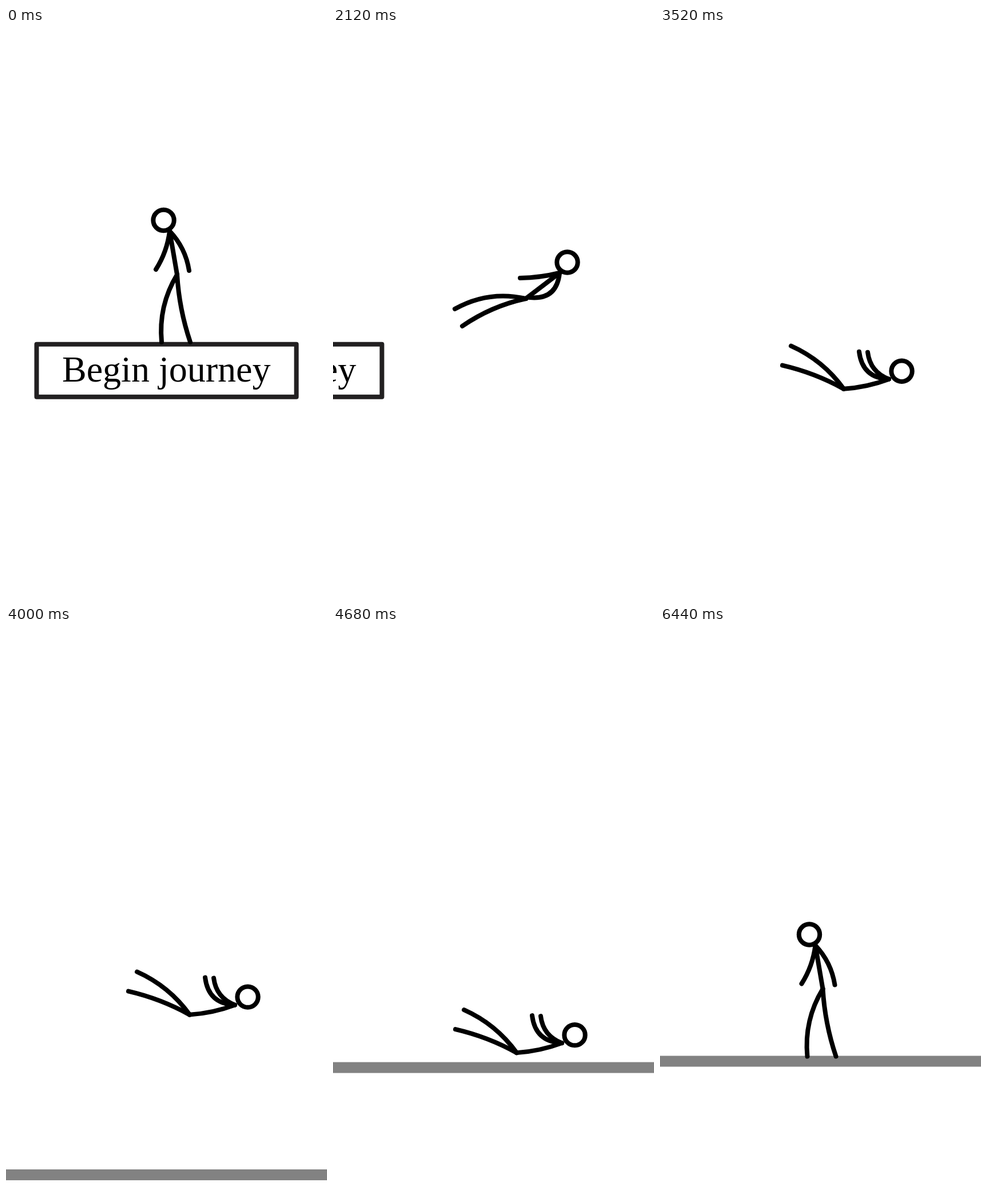
Animation of 561x998 px, one loop 6560 ms. Source, as an HTML page with a canvas:

```html
<!DOCTYPE html>
<html lang="en">
<head>
<meta charset="utf-8">
<title>Begin journey</title>
<style>
  html, body { margin: 0; width: 100%; height: 100%; overflow: hidden; background: #fff; }
  canvas { display: block; }
</style>
</head>
<body>
<canvas id="stage" width="561" height="998"></canvas>
<script>
const ctx = document.getElementById('stage').getContext('2d');
const LOOP = 6560, JUMP = 1600, PAN = 1720, LANDING = 4720, LYING = 4880;
const FLOOR = 749.5, FALL_SPEED = 0.0978, FLOOR_SPEED = 0.2757, PAN_SPEED = 1.055;

// A pose has points for head, neck, hip, two hands and two feet.
// Each limb joins two of them and bows sideways by some pixels.
const LIMBS = [[1, 2], [1, 3], [1, 4], [2, 5], [2, 6]];

const stand = {
  points: [[275.5, 336], [286, 355], [299, 431], [262, 422], [320, 424], [272, 549], [322, 549]],
  bows: [0, -4, -6, 10, 4]
};
const fly = {
  points: [[409.5, 409.5], [396, 428], [337, 473], [327, 437], [343, 471], [213, 491], [226, 521]],
  bows: [0, -2, -17, 12, 6]
};
const fall = {
  points: [[422.5, 541], [400, 555], [321, 572], [348, 507], [363, 508], [229, 497], [214, 531]],
  bows: [-3, -15, -9, 8, 4]
};
const sit = {
  points: [[340, 666], [328, 684], [300, 748], [285, 725], [362, 750], [228, 751], [209, 751]],
  bows: [0, -6, -8, 20, 16]
};

const mapPoints = (pose, change) => ({ ...pose, points: pose.points.map(change) });
const move = (pose, dx, dy) => mapPoints(pose, ([x, y]) => [x + dx, y + dy]);
const moveUpper = (pose, dx, dy) =>
  mapPoints(pose, ([x, y], i) => i < 5 && i !== 2 ? [x + dx, y + dy] : [x, y]);
const moveHip = (pose, dx, dy) =>
  mapPoints(pose, ([x, y], i) => i === 2 ? [x + dx, y + dy] : [x, y]);
const squash = (pose, k) =>
  mapPoints(pose, ([x, y]) => [x, FLOOR + (y - FLOOR) * k]);

const breathe = t => moveUpper(stand, 0, 4 * Math.cos(t / 400 * Math.PI) - 4);
const crouch = moveHip(moveUpper(stand, 45, 50), -8, 34);
const arrived = move(stand, -14.5, 201.5);
const landed = move(fall, 0, (LANDING - 2920) * FALL_SPEED);

const linear = u => u;
const easeOut = u => 1 - (1 - u) ** 1.7;
const keys = [
  [1520, stand], [1680, crouch], [2120, fly], [2920, fall, easeOut], [LANDING, landed],
  [LYING, squash(landed, 0.5)], [5600, sit], [6080, move(crouch, -14.5, 201.5)],
  [6320, moveUpper(arrived, 0, 4)], [6440, arrived], [LOOP, arrived]
];

const mix = (a, b, k) => a + (b - a) * k;

function poseAt(t) {
  if (t < JUMP) return breathe(Math.floor(t / 200) * 200);
  const next = keys.findIndex(key => key[0] > t);
  const [start, from] = keys[next - 1];
  const [end, to, ease = linear] = keys[next];
  const k = ease((t - start) / (end - start));
  return {
    points: from.points.map((p, i) => p.map((v, axis) => mix(v, to.points[i][axis], k))),
    bows: from.bows.map((bow, i) => mix(bow, to.bows[i], k))
  };
}

// The drawing is held longer during the crouch, the landing and the getting up.
function snap(t) {
  if (t >= LYING) return LYING + Math.floor((t - LYING) / 120) * 120;
  const step = t >= LANDING || (t >= JUMP && t < 1760) ? 80 : 40;
  return Math.floor(t / step) * step;
}

function drawLimb([x1, y1], [x2, y2], bow) {
  const k = 2 * bow / Math.hypot(x2 - x1, y2 - y1);
  ctx.beginPath();
  ctx.moveTo(x1, y1);
  ctx.quadraticCurveTo((x1 + x2) / 2 - (y2 - y1) * k, (y1 + y2) / 2 + (x2 - x1) * k, x2, y2);
  ctx.stroke();
}

function drawFigure({ points, bows }) {
  ctx.strokeStyle = '#000';
  LIMBS.forEach(([a, b], i) => drawLimb(points[a], points[b], bows[i]));
  ctx.beginPath();
  ctx.arc(...points[0], 18.2, 0, 2 * Math.PI);
  ctx.fillStyle = '#fff';
  ctx.fill();
  ctx.stroke();
}

function drawSign(x) {
  ctx.strokeStyle = '#222021';
  ctx.strokeRect(x + 53.5, 552.8, 454, 92);
  ctx.fillStyle = '#000';
  ctx.font = '64px "Liberation Serif", "Times New Roman", serif';
  ctx.fillText('Begin journey', x + 98, 617.5);
}

function drawFloor(y) {
  ctx.fillStyle = '#828282';
  ctx.fillRect(0, y, 561, 19);
}

function draw(now) {
  const t = snap(now % LOOP);
  ctx.fillStyle = '#fff';
  ctx.fillRect(0, 0, 561, 998);
  ctx.lineWidth = 8;
  ctx.lineCap = ctx.lineJoin = 'round';
  if (t < LANDING) drawSign(-PAN_SPEED * Math.max(0, t - PAN));
  if (t > JUMP) drawFloor(FLOOR + FLOOR_SPEED * Math.max(0, LANDING - t));
  drawFigure(poseAt(t));
}

const begin = performance.now();
function tick() {
  draw(performance.now() - begin);
  requestAnimationFrame(tick);
}
tick();
</script>
</body>
</html>
```
